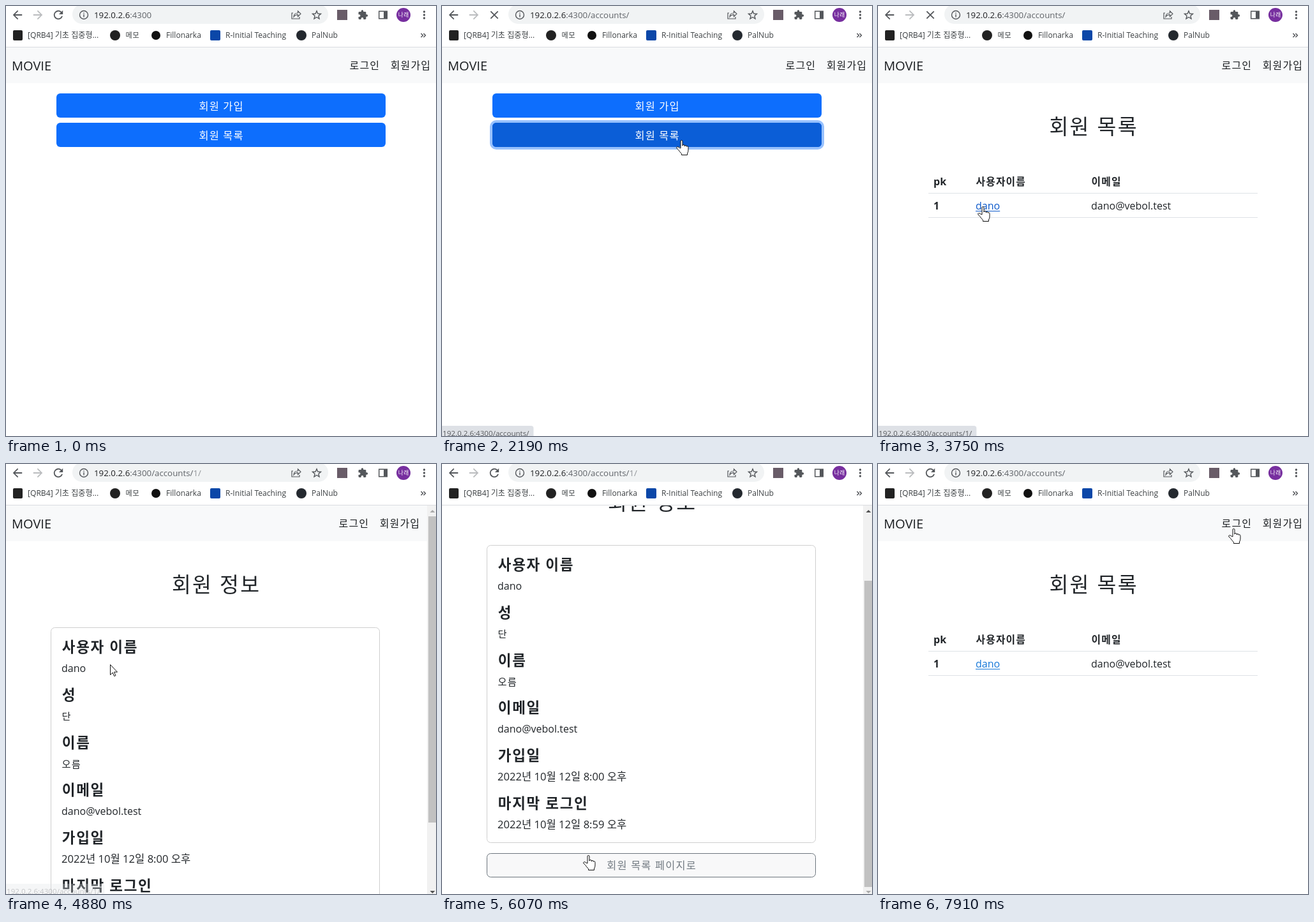
An HTML page with a canvas that plays this animation: 674 px wide and 674 px high, repeating every 8 s.

```html
<!DOCTYPE html>
<html lang="ko">
<head>
<meta charset="utf-8">
<style>
html, body { margin: 0; width: 100%; height: 100%; overflow: hidden; background: #fff; }
canvas { display: block; }
</style>
</head>
<body>
<canvas id="stage" width="674" height="674"></canvas>
<script>
const ctx = document.getElementById('stage').getContext('2d');
const FONT = '"Open Sans", "Noto Sans CJK KR", "Noto Sans CJK", sans-serif';
const INK = '#212529', ICON = '#54575b', BLUE = '#0d6efd', GRAY = '#6c757d';
const LOOP = 8000, TOP = 65, SIZE = 674, MAX_SCROLL = 129;
const HOST = '192.0.2.6', PORT = ':4300', LIST = '/accounts/', USER = 'dano', MAIL = 'dano@vebol.test';

const clamp = v => Math.min(1, Math.max(0, v));
const ramp = (t, from, to) => clamp((t - from) / (to - from));
const smooth = p => p * p * (3 - 2 * p);
const between = (t, ...spans) => spans.some(([a, b]) => t >= a && t < b);
// Latest entry of a [time, value] list that has started
const latest = (list, t) => list.filter(([at]) => at <= t).pop()[1];

function text(str, x, y, size, color = INK, { weight = 400, align = 'left' } = {}) {
  // Purely Korean labels are set a little smaller and looser
  const korean = /^[가-힣 ]+$/.test(str);
  const tracking = korean ? size * .066 : 0;
  ctx.font = `${weight} ${korean ? size * .92 : size}px ${FONT}`;
  ctx.letterSpacing = tracking + 'px';
  ctx.textAlign = align;
  ctx.fillStyle = color;
  const trailing = { left: .5, center: .5, right: 1 }[align];
  ctx.fillText(str, x + tracking * trailing, y - (korean ? size * .02 : 0));
  const width = ctx.measureText(str).width;
  ctx.letterSpacing = '0px';
  return width;
}
function rect(x, y, w, h, color) {
  ctx.fillStyle = color;
  ctx.fillRect(x, y, w, h);
}
function box(x, y, w, h, r, fill, stroke, line = 1) {
  ctx.beginPath();
  ctx.roundRect(x, y, w, h, r);
  if (fill) { ctx.fillStyle = fill; ctx.fill(); }
  if (stroke) { ctx.strokeStyle = stroke; ctx.lineWidth = line; ctx.stroke(); }
}
function disc(x, y, r, color) {
  ctx.beginPath();
  ctx.arc(x, y, r, 0, 7);
  ctx.fillStyle = color;
  ctx.fill();
}
function shape(path, x, y, scale, fill, stroke, line = 1) {
  ctx.save();
  ctx.translate(x, y);
  ctx.scale(scale, scale);
  const p = new Path2D(path);
  if (fill) { ctx.fillStyle = fill; ctx.fill(p); }
  if (stroke) { ctx.strokeStyle = stroke; ctx.lineWidth = line; ctx.stroke(p); }
  ctx.restore();
}

const BACK = 'M8-1H-4.2L1.4-6.6 0-8-8 0 0 8 1.4 6.6-4.2 1H8Z';
const FORWARD = 'M-8-1H4.2L-1.4-6.6 0-8 8 0 0 8-1.4 6.6 4.2 1H-8Z';
const RELOAD = 'M5.65-5.65A8 8 0 1 0 7.73 2H5.65A6 6 0 1 1 4.22-4.22L1-1H8V-8Z';
const STOP = 'M7-5.6 5.6-7 0-1.4-5.6-7-7-5.6-1.4 0-7 5.6-5.6 7 0 1.4 5.6 7 7 5.6 1.4 0Z';
const STAR = 'M0-6.3 1.8-2 6.5-1.7 2.9 1.4 4 6 0 3.5-4 6-2.9 1.4-6.5-1.7-1.8-2Z';
const SHARE = 'M-5-3H-7V6H5V3M-4 3C-4-1-1-3 2.5-3V-6L7-1.7 2.5 2.5V-.3C-.5-.3-2.5.5-4 3Z';
const PUZZLE = 'M8.5-1H7V-5Q7-7 5-7H1V-8.5A2.5 2.5 0 0 0-4-8.5V-7H-8Q-10-7-10-5V-1.2H-8.5A2.7 2.7 0 0 1-8.5 4.2H-10V8Q-10 10-8 10H-4.2V8.5A2.7 2.7 0 0 1 1.2 8.5V10H5Q7 10 7 8V4H8.5A2.5 2.5 0 0 0 8.5-1Z';

const POINTERS = {
  arrow: 'M.5.5V16.5L4.2 13 6.7 18.6 8.9 17.6 6.5 12.1H11.5Z',
  hand: 'M0 13V2Q0 .5 1.5.5T3 2V9Q3 7.5 4.7 7.5T6.3 9.2V10Q6.5 8.6 8 8.6T9.5 10.3Q10 9.6 11 9.8T12 11.5V16Q12 19 10.5 21V23.5H1.5V21.5Q-1 19-3.5 15.5L-6 13Q-7 11.5-5.5 10.8-4 10.3-2.5 11.8Z',
  beam: 'M-3-7.5H-1L.5-6.5 2-7.5H4M.5-6.5V6.5M-3 7.5H-1L.5 6.5 2 7.5H4'
};
const POINTER_KINDS = [
  [70, 'arrow'], [920, 'hand'], [2320, 'arrow'], [2520, 'beam'], [2990, 'arrow'], [3420, 'hand'],
  [4480, 'arrow'], [5990, 'hand'], [6810, 'arrow'], [7790, 'hand']
];
const POINTER_PATH = [
  [240, 623, 665], [990, 374, 210], [2460, 374, 210], [2520, 376, 207], [2920, 376, 207],
  [3550, 163, 314], [5250, 163, 314], [6050, 228, 613], [6100, 228, 613], [6400, 220, 634],
  [6900, 220, 634], [7570, 534, 206], [7880, 556, 101]
];
const PAGES = [[0, home], [2520, list], [4610, () => {}], [4810, detail], [6810, () => {}], [7020, list]];
const PATHS = [[0, ''], [2190, LIST], [4480, LIST + '1/'], [6810, LIST]];

function browserBar(t) {
  rect(0, 0, SIZE, 64, '#fff');
  rect(0, 64, SIZE, 1, '#dadce0');
  shape(BACK, 18, 14, .9, ICON);
  shape(FORWARD, 50, 14, .9, '#babcbe');
  const loading = between(t, [1400, 2520], [3750, 4810], [6480, 7020]);
  shape(loading ? STOP : RELOAD, 82, 14, .9, ICON);

  box(104, -2, 401, 30, 15, '#f1f3f4');
  shape('M-6.5 0A6.5 6.5 0 1 0 6.5 0 6.5 6.5 0 1 0-6.5 0M0-1V3.6M0-3.6V-2.1', 122, 14, 1, null, ICON, 1.4);
  let x = 138 + text(HOST, 138, 19, 13.3, '#202124');
  const path = latest(PATHS, t);
  x += text(PORT + path.slice(0, LIST.length), x, 19, 13.3, '#5f6368');
  text(path.slice(LIST.length), x, 19, 13.3, '#94979b');

  shape(SHARE, 455, 14, 1, null, ICON, 1.2);
  shape(STAR, 487, 14, 1, null, ICON, 1.4);
  rect(519, 6, 16, 16, '#695c68');
  shape(PUZZLE, 559.5, 14, .7, ICON);
  box(584.7, 8.2, 12.6, 11.6, 0, null, ICON, 1.5);
  rect(592, 8, 6, 12, ICON);
  disc(623, 14, 11, '#772f9f');
  text('나래', 623, 17.5, 9.5, '#fff', { align: 'center' });
  [9, 14, 19].forEach(y => disc(655.5, y, 1.7, ICON));

  box(11, 38, 15, 16, 2, '#222');
  disc(171, 46, 8, '#222');
  disc(235, 46, 7, '#111');
  box(320, 38, 16, 16, 2, '#0b47a8');
  disc(463, 46, 8, '#24292f');
  [['[QRB4] 기초 집중형...', 34], ['메모', 187], ['Fillonarka', 251], ['R-Initial Teaching', 344], ['PalNub', 479]]
    .forEach(([label, left]) => text(label, left, 50, 12.1, '#3c4043'));
  shape('M-4-3-1 0-4 3M0-3 3 0 0 3', 654.5, 46, 1, null, ICON, 1.5);
}

function navbar(width) {
  rect(0, TOP, SIZE, 56, '#f8f9fa');
  text('MOVIE', 9, 101, 20, '#1c1f22');
  text('로그인', width - 89, 99, 17.4, '#1c1f22', { align: 'right' });
  text('회원가입', width - 9, 99, 17.4, '#1c1f22', { align: 'right' });
}
function title(str, center) {
  text(str, center, 202, 35.3, INK, { weight: 300, align: 'center' });
}

function home(t) {
  navbar(SIZE);
  const hover = ramp(t, 900, 1050), pressed = ramp(t, 1330, 1470);
  if (pressed) box(75, 179, 524, 46, 10, `rgba(49,132,253,${pressed / 2})`);
  [['회원 가입', 137], ['회원 목록', 183]].forEach(([label, y], i) => {
    box(79, y, 516, 38, 6, BLUE);
    if (i) box(79, y, 516, 38, 6, `rgba(11,94,215,${hover})`);
    text(label, 337, y + 26, 17.8, '#fff', { align: 'center' });
  });
}

function list(t) {
  navbar(SIZE);
  title('회원 목록', 337);
  const bold = { weight: 700 };
  text('pk', 87, 281, 16, INK, bold);
  text('사용자이름', 153, 281, 17.2, INK, bold);
  text('이메일', 334, 281, 17.2, INK, bold);
  text('1', 87, 319, 16, INK, bold);
  const link = between(t, [3420, 4480]) ? '#0a58ca' : '#1577d8';
  rect(153, 321, text(USER, 153, 319, 16, link), 1, link);
  text(MAIL, 334, 319, 16);
  rect(79, 293, 516, 1, '#dee2e6');
  rect(79, 331, 516, 1, '#dee2e6');
}

function detail(t) {
  const scroll = Math.round(MAX_SCROLL * smooth(ramp(t, 5020, 5450)));
  ctx.save();
  ctx.translate(0, -scroll);
  navbar(657);
  title('회원 정보', 328.5);
  box(70.5, 256.5, 515, 466, 6, '#fff', '#cfcfcf');
  [['사용자 이름', USER], ['성', '단'], ['이름', '오름'], ['이메일', MAIL],
   ['가입일', '2022년 10월 12일 8:00 오후'], ['마지막 로그인', '2022년 10월 12일 8:59 오후']]
    .forEach(([label, value], i) => {
      const y = Math.round(295 + i * 74.8);
      text(label, 87, y, 24.5, INK, { weight: 700 });
      text(value, 87, y + 31, /[가-힣]/.test(value) ? 16.6 : 16);
    });

  const hover = ramp(t, 6064, 6214);
  if (t >= 6480) box(66.5, 735.5, 523, 45, 10, 'rgba(108,117,125,.5)');
  box(70.5, 739.5, 515, 37, 6, '#fff');
  box(70.5, 739.5, 515, 37, 6, `rgba(108,117,125,${hover})`, GRAY);
  const shade = [108, 117, 125].map(c => Math.round(c + (255 - c) * hover));
  text('회원 목록 페이지로', 328, 764.5, 17.8, `rgb(${shade})`, { align: 'center' });
  ctx.restore();

  rect(660, TOP, 14, 609, '#f1f1f1');
  rect(662, 82 + scroll * 101 / MAX_SCROLL, 12, 480, '#c1c1c1');
  shape('M-4 2 0-2 4 2Z', 668.5, 74, 1, scroll ? '#505050' : '#a9a9a9');
  shape('M-4-2 0 2 4-2Z', 668.5, 671, 1, scroll < MAX_SCROLL ? '#505050' : '#a9a9a9');
}

function statusBubble(t) {
  const shows = [[1130, 1330, 2440, 2620, ''], [3480, 3660, 4770, 4930, '1/'], [6230, 6400, 6960, 7130, '']];
  for (const [inFrom, inTo, outFrom, outTo, tail] of shows) {
    const alpha = ramp(t, inFrom, inTo) * (1 - ramp(t, outFrom, outTo));
    if (!alpha) continue;
    const label = HOST + PORT + LIST + tail;
    ctx.globalAlpha = alpha;
    ctx.font = `400 11.6px ${FONT}`;
    box(-5, 658, ctx.measureText(label).width + 13, 30, 4, '#dee1e6');
    text(label, 1, 673.5, 11.6, '#585b5f');
    ctx.globalAlpha = 1;
  }
}

function pointer(t) {
  if (t < 70) return;
  const next = POINTER_PATH.findIndex(([at]) => at > t);
  const to = POINTER_PATH.at(next), from = next > 0 ? POINTER_PATH[next - 1] : to;
  const p = from === to ? 0 : smooth(ramp(t, from[0], to[0]));
  const [x, y] = [1, 2].map(k => Math.round(from[k] + (to[k] - from[k]) * p));
  const kind = latest(POINTER_KINDS, t);
  shape(POINTERS[kind], x, y, 1, kind === 'beam' ? null : '#fff', '#111');
}

function draw(now) {
  const t = now % LOOP;
  rect(0, 0, SIZE, SIZE, '#fff');
  ctx.save();
  ctx.beginPath();
  ctx.rect(0, TOP, SIZE, SIZE - TOP);
  ctx.clip();
  latest(PAGES, t)(t);
  ctx.restore();
  browserBar(t);
  statusBubble(t);
  pointer(t);
  requestAnimationFrame(draw);
}
requestAnimationFrame(draw);
</script>
</body>
</html>
```
